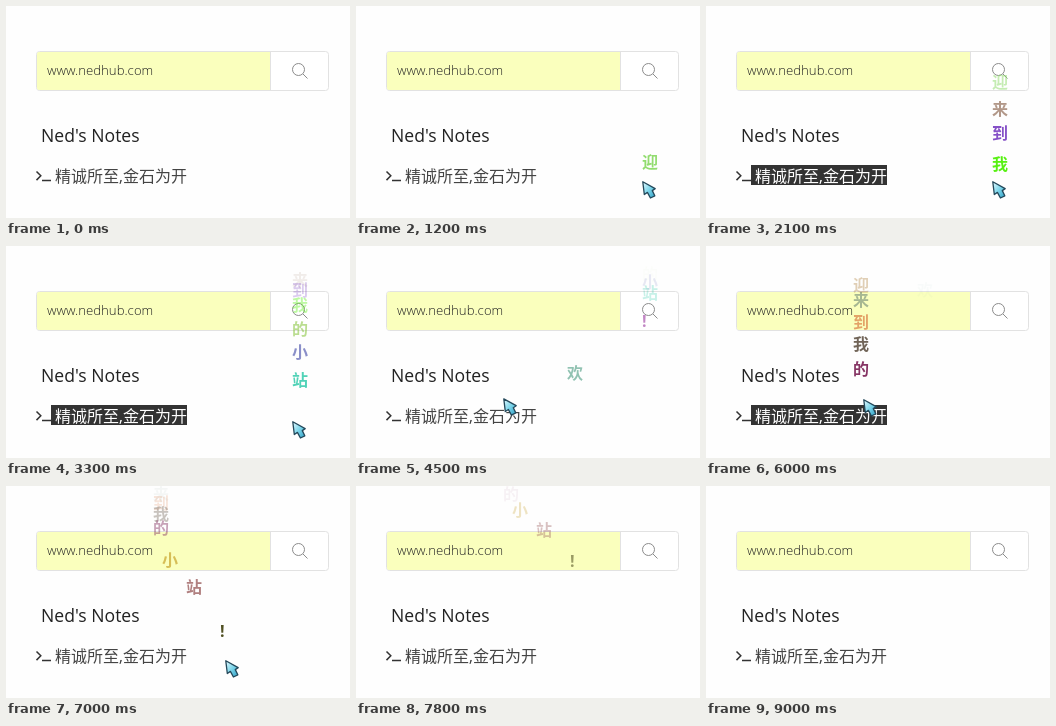
These frames come from a looping animation (344x212 px, 9.3 s). An HTML page:

```html
<!DOCTYPE html>
<html lang="zh-CN">
<head>
<meta charset="utf-8">
<title>Notes</title>
<style>
html, body { margin: 0; width: 100%; height: 100%; overflow: hidden; background: #fefefe; }
svg { display: block; width: 344px; height: 212px; }
text { font-family: "Open Sans", "Noto Sans CJK SC", "Noto Sans CJK", sans-serif; }
.float { font-size: 16px; font-weight: 700; }
</style>
</head>
<body>
<svg viewBox="0 0 344 212">
  <defs>
    <linearGradient id="ice" x1="0" y1="0" x2="1" y2="1">
      <stop offset="0" stop-color="#e4faff"/>
      <stop offset=".5" stop-color="#7bd5ea"/>
      <stop offset="1" stop-color="#2f9fc4"/>
    </linearGradient>
  </defs>
  <rect x="30.5" y="45.5" width="292" height="39" rx="3" fill="#fff" stroke="#e2e2e2"/>
  <path d="M264 46H33a2 2 0 0 0-2 2V82a2 2 0 0 0 2 2H264Z" fill="#faffbd"/>
  <path d="M264.5 46V84" stroke="#e2e2e2"/>
  <text x="41" y="69" font-size="13.2" font-weight="300" fill="#222">www.nedhub.com</text>
  <g fill="none" stroke="#8c8c8c">
    <circle cx="292.5" cy="63.5" r="6"/>
    <path d="M297 68L301.5 72.5"/>
  </g>
  <text x="35" y="136" font-size="17.6" fill="#222">Ned's Notes</text>
  <path d="M30.5 165.5L34.8 169.8L30.5 174.1M36 174.5H45" fill="none" stroke="#333" stroke-width="1.5"/>
  <rect id="mark" x="45" y="159" width="136" height="20" fill="#333"/>
  <text id="motto" x="49" y="176" font-size="16">精诚所至,金石为开</text>
  <g id="floats"></g>
  <path id="cursor" d="M.8.8L2.3 13.5L5.4 11.4L8.4 17L12.8 14.8L10.3 9.6L13.2 7.6Z"
    fill="url(#ice)" stroke="#24485a" stroke-width="1.3" stroke-linejoin="round"/>
</svg>
<script>
const LOOP = 9300, STEP = 100, LIFE = 2.1;
const $ = id => document.getElementById(id);

// Each click: time, pointer x, pointer y, colour
const clicks = [
  [1150, 286, 175, '#8fdc6c'], [1500, 286, 175, '#906a54'],
  [1770, 286, 175, '#6c2cbc'], [2070, 286, 175, '#55f010'],
  [2450, 286, 175, '#86c43c'], [2740, 286, 175, '#5c62b4'],
  [3040, 286, 175, '#36ccac'], [3530, 286, 175, '#88148c'],
  [4000, 211, 190, '#6cae98'],
  [4800, 147, 153, '#b48848'], [5045, 147, 153, '#587468'],
  [5340, 147, 153, '#d8743c'], [5595, 147, 153, '#4c3c2c'],
  [5850, 147, 153, '#7c2458'],
  [6320, 156, 153, '#c49c20'], [6530, 180, 162, '#985858'],
  [6900, 214, 170, '#484818']
];
const words = '欢迎来到我的小站!';

// Pointer path: time, x, y
const path = [
  [100, 296, 183], [300, 288, 152], [600, 286, 175], [3550, 286, 175],
  [3700, 234, 190], [4000, 211, 190], [4400, 147, 152], [5850, 147, 153],
  [6000, 157, 153], [6320, 157, 153], [6530, 180, 162], [6700, 214, 170],
  [6900, 215, 171], [7000, 219, 174], [7300, 250, 182], [7600, 280, 192]
];

const floats = clicks.map(([time, x, y, color], i) => {
  const el = document.createElementNS('http://www.w3.org/2000/svg', 'text');
  el.textContent = words[(i + 1) % words.length];
  el.setAttribute('class', 'float');
  el.setAttribute('x', x);
  el.setAttribute('fill', color);
  $('floats').append(el);
  return { el, time, y };
});

function pointerAt(t) {
  const i = path.findIndex(p => p[0] >= t);
  if (i < 0 || t < path[0][0]) return null;
  const b = path[i], a = path[Math.max(0, i - 1)];
  const k = b === a ? 0 : (t - a[0]) / (b[0] - a[0]);
  return [a[1] + (b[1] - a[1]) * k, a[2] + (b[2] - a[2]) * k];
}

function draw(t) {
  for (const { el, time, y } of floats) {
    const age = (t - time) / 1000;
    const alive = age >= 0 && age < LIFE;
    el.style.display = alive ? '' : 'none';
    if (!alive) continue;
    // Rises quickly, then slows down while fading
    el.setAttribute('y', y - 8 - 110 * age + 22 * age * age);
    el.style.opacity = (1 - age / LIFE) ** 1.1;
  }
  const selected = (t >= 1500 && t < 4000) || (t >= 5100 && t < 6400);
  $('mark').style.display = selected ? '' : 'none';
  $('motto').setAttribute('fill', selected ? '#fff' : '#444');
  const pos = pointerAt(t);
  $('cursor').style.display = pos ? '' : 'none';
  if (pos) $('cursor').setAttribute('transform', `translate(${pos})`);
}

const start = performance.now();
function tick() {
  const t = (performance.now() - start) % LOOP;
  draw(Math.min(9000, Math.floor(t / STEP) * STEP));
  requestAnimationFrame(tick);
}
tick();
</script>
</body>
</html>
```
